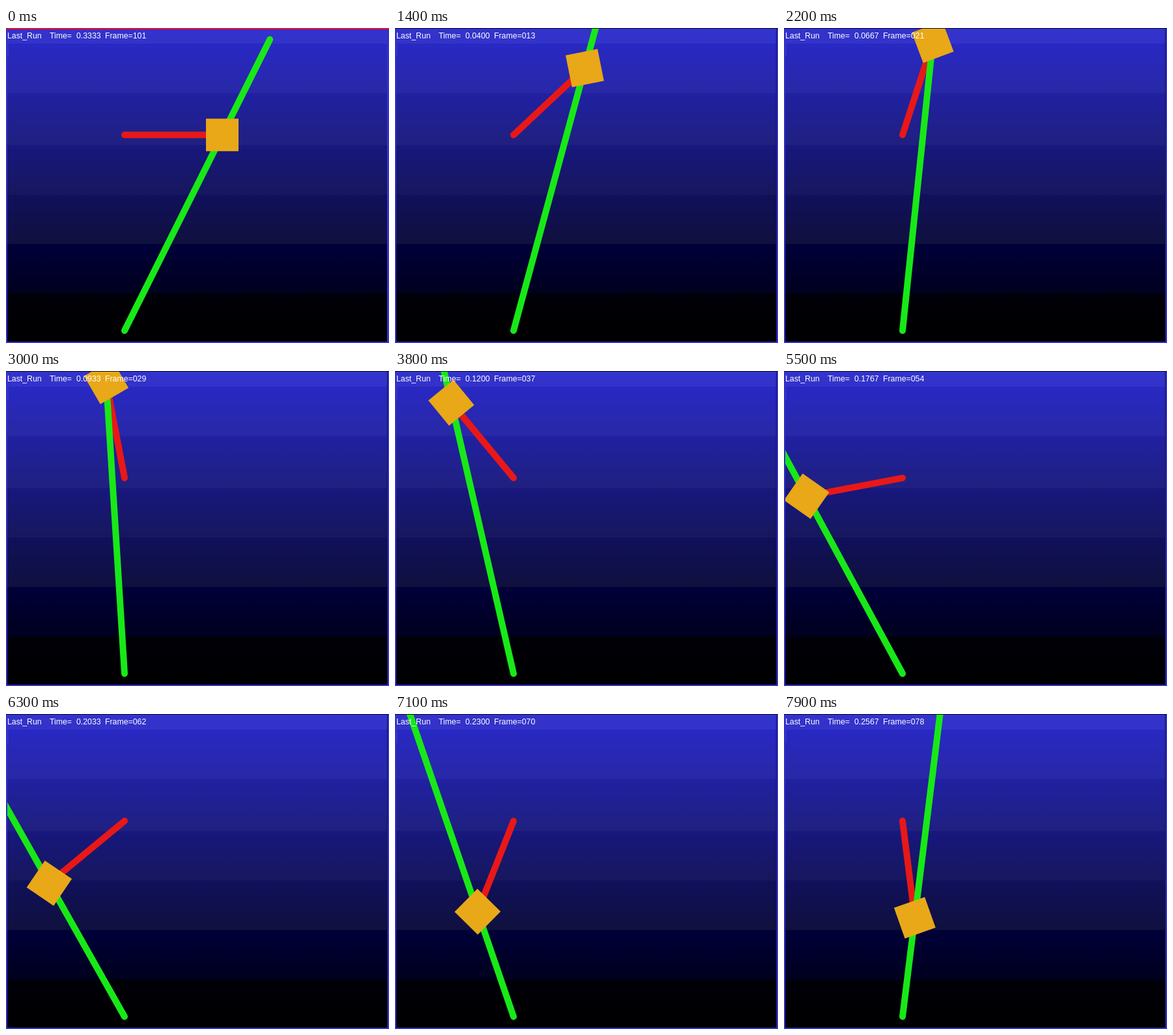
An HTML page with a canvas for the animation above (8 s loop, 588x484 px).

```html
<!DOCTYPE html>
<html lang="en">
<head>
<meta charset="utf-8">
<title>Crank and slotted lever</title>
<style>
html, body { margin: 0; width: 100%; height: 100%; overflow: hidden; background: #000; }
canvas { display: block; }
</style>
</head>
<body>
<canvas id="stage" width="588" height="484"></canvas>
<script>
const W = 588, H = 484, STEP = 100, LOOP = 8000;
const ctx = document.getElementById('stage').getContext('2d');

const crank = { x: 182, y: 164.3, length: 150 };
const lever = { x: 182, y: 465, length: 500 };
const BLOCK = 50;
const REST = Math.atan2(crank.length, lever.y - crank.y);
const BLUE = '#3333cc';

// top edge, red/green level, blue at the top and bottom of each band
const bands = [
  [0, 51, 207, 200],
  [24, 40, 196, 166],
  [100, 32, 162, 128],
  [180, 23, 126, 94],
  [256, 16, 92, 62],
  [332, 0, 58, 30],
  [408, 0, 8, 0]
];

function rect(color, x, y, w, h) {
  ctx.fillStyle = color;
  ctx.fillRect(x, y, w, h);
}

function drawBackground(first) {
  bands.forEach(([y, level, from, to], i) => {
    const end = i + 1 < bands.length ? bands[i + 1][0] : H;
    const fill = ctx.createLinearGradient(0, y, 0, end);
    fill.addColorStop(0, `rgb(${level},${level},${from})`);
    fill.addColorStop(1, `rgb(${level},${level},${to})`);
    rect(fill, 0, y, W, end - y);
  });
  rect(BLUE, 2, 24, 2, 20);
  rect(BLUE, 0, 0, 2, H);
  rect(BLUE, 0, H - 2, W, 2);
  rect(BLUE, W - 3, 0, 3, H);
  if (first) {
    rect('#f01020', 0, 0, W, 2);
  } else {
    rect('#10102c', 0, 0, W, 1);
    rect('#101050', W - 3, 0, 1, H - 2);
  }
}

function rod(color, x1, y1, x2, y2) {
  ctx.strokeStyle = color;
  ctx.lineWidth = 10;
  ctx.lineCap = 'round';
  ctx.beginPath();
  ctx.moveTo(x1, y1);
  ctx.lineTo(x2, y2);
  ctx.stroke();
}

function drawLinkage(angle) {
  const x = crank.x + crank.length * Math.cos(angle);
  const y = crank.y - crank.length * Math.sin(angle);
  const tilt = Math.atan2(x - lever.x, lever.y - y);

  ctx.save();
  ctx.beginPath();
  ctx.rect(2, 1, W - 5, H - 3);
  ctx.clip();
  rod('#e81818', crank.x, crank.y, x, y);
  rod('#18e818', lever.x, lever.y,
    lever.x + lever.length * Math.sin(tilt),
    lever.y - lever.length * Math.cos(tilt));
  ctx.translate(x, y);
  ctx.rotate(tilt - REST);
  rect('#e8a818', -BLOCK / 2, -BLOCK / 2, BLOCK, BLOCK);
  ctx.restore();
}

function drawLabel(count) {
  ctx.font = '12.3px "Liberation Sans", Arial, sans-serif';
  ctx.fillStyle = '#fff';
  ctx.fillText('Last_Run', 2, 16);
  ctx.fillText('Time=', 67, 16);
  ctx.fillText(((count - 1) / 300).toFixed(4), 108, 16);
  ctx.fillText('Frame=' + String(count).padStart(3, '0'), 152, 16);
}

function draw(now) {
  const step = Math.floor((now % LOOP) / STEP);
  const count = step === 0 ? 101 : Math.max(1, step - 1);
  drawBackground(step === 0);
  drawLinkage((count - 1) * Math.PI / 50);
  drawLabel(count);
}

let start;
function tick(now) {
  if (start === undefined) start = now;
  draw(Math.max(0, now - start));
  requestAnimationFrame(tick);
}
draw(0);
requestAnimationFrame(tick);
</script>
</body>
</html>
```
